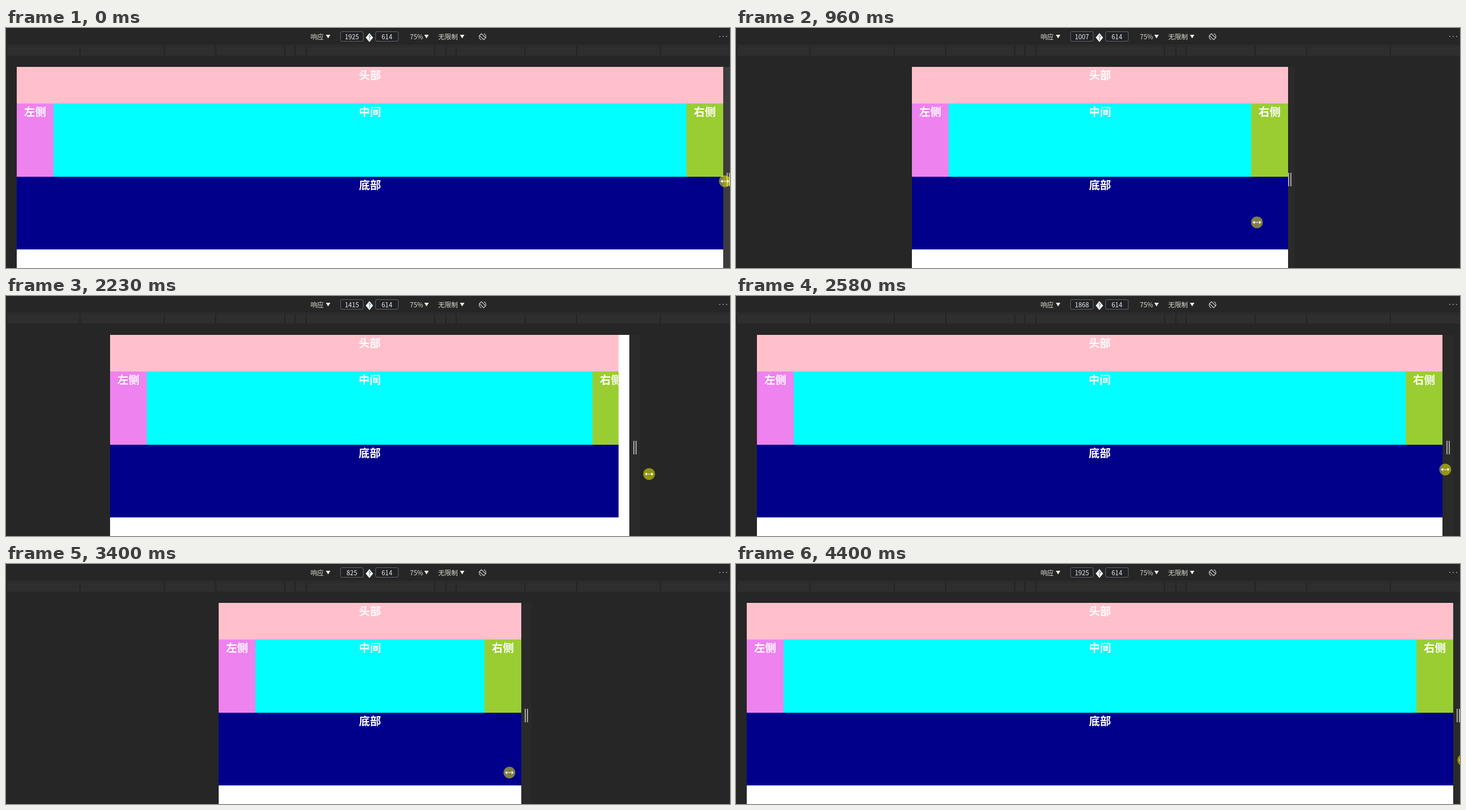
Recreate the animation shown at these times as an HTML page with a canvas. Size 1280 px wide and 426 px high, loop 4.62 s.

```html
<!DOCTYPE html>
<html lang="zh">
<head>
<meta charset="utf-8">
<style>
  html, body { margin: 0; width: 100%; height: 100%; overflow: hidden; background: #262626; }
  canvas { display: block; }
</style>
</head>
<body>
<canvas id="stage" width="1280" height="426"></canvas>
<script>
const ctx = document.getElementById('stage').getContext('2d');
const LOOP = 4620, CENTER = 643.5, SCALE = 1249 / 1925;
const FONT = '"Noto Sans CJK SC", "Noto Sans CJK", "Noto Sans", sans-serif';

// Bursts of eight screen updates: first, last
const BURSTS = [
  [150, 620], [690, 1160], [1220, 1220], [1690, 2170], [2230, 2720],
  [2770, 3260], [3330, 3800], [3870, 4330], [4400, 4400]
];

// time, device width, cursor x, cursor y, then optional lag of pane, layout and clip
const KEYS = [
  [0, 1925, 1271, 272],
  [150, 1910, 1258, 276],
  [620, 1441, 1070, 332],
  [960, 1007, 921, 345, 18, 18, 18],
  [1160, 689, 869, 349, 3],
  [1220, 687, 868, 349, 5],
  [1690, 687, 868, 349, 5],
  [1950, 860, 950, 344],
  [2170, 1231, 1102, 322],
  [2230, 1415, 1137, 316, 0, 0, -29],
  [2450, 1780, 1240, 308],
  [2600, 1882, 1256, 308],
  [2720, 1879, 1250, 312],
  [2980, 1294, 1033, 351],
  [3260, 900, 890, 368],
  [3540, 760, 890, 372],
  [3800, 1102, 1048, 370],
  [3870, 1247, 1116, 368, -59, 0, -59],
  [4260, 1925, 1290, 350],
  [4330, 1925, 1297, 348],
  [4400, 1925, 1286, 348]
];

function heldTime(t) {
  let held = 0;
  for (const [first, last] of BURSTS) {
    if (t < first) break;
    const step = (last - first) / (first === 3330 ? 6 : 7);
    const n = step ? Math.floor((t - first) / step + 0.2) : 0;
    held = Math.min(last, first + n * step);
  }
  return Math.round(held / 10) * 10;
}

function poseAt(t) {
  const i = Math.max(1, KEYS.findIndex(k => k[0] >= t));
  const a = KEYS[i - 1], b = KEYS[i], p = (t - a[0]) / (b[0] - a[0]);
  return Array.from({ length: 7 }, (_, j) => {
    const from = a[j] || 0, to = b[j] || 0;
    return from + (to - from) * p;
  });
}

function rect(x, y, w, h, color) {
  ctx.fillStyle = color;
  ctx.fillRect(x, y, w, h);
}

function text(str, x, y, size, color, align = 'left', weight = 400) {
  ctx.font = `${weight} ${size}px ${FONT}`;
  ctx.textAlign = align;
  ctx.fillStyle = color;
  ctx.fillText(str, x, y);
}

function polygon(color, ...points) {
  ctx.fillStyle = color;
  ctx.beginPath();
  points.forEach(([x, y]) => ctx.lineTo(x, y));
  ctx.fill();
}

function menu(label, x, arrowX) {
  text(label, x, 20, 11.6, '#dcdccf');
  polygon('#f0f0e6', [arrowX - 4, 12], [arrowX + 4, 12], [arrowX, 18.5]);
}

function numberBox(x, value) {
  ctx.beginPath();
  ctx.roundRect(x, 6.5, 40, 17, 2.5);
  ctx.fillStyle = '#202125';
  ctx.fill();
  ctx.strokeStyle = '#63656a';
  ctx.lineWidth = 1;
  ctx.stroke();
  text(value, x + 20, 20, 11.3, '#f2f2f2', 'center');
}

function rotateIcon() {
  ctx.save();
  ctx.translate(842.5, 15.5);
  ctx.strokeStyle = '#d4d4d4';
  ctx.lineWidth = 1.1;
  for (const turn of [0, 1]) {
    ctx.beginPath();
    ctx.arc(0, 0, 6, turn * Math.PI - 1.2, turn * Math.PI + 0.3);
    ctx.stroke();
  }
  ctx.rotate(-Math.PI / 4);
  ctx.strokeRect(-2.3, -5.3, 4.6, 10.6);
  ctx.restore();
}

function toolbar(width) {
  menu('响应', 538.5, 569.5);
  numberBox(591.5, Math.round(width));
  polygon('#f4fbfb', [642.5, 9], [649, 17], [642.5, 25], [636, 17]);
  text('?', 642.5, 21, 10, '#23444c', 'center');
  numberBox(653.5, 614);
  menu('75%', 714, 743.5);
  menu('无限制', 764, 806.5);
  rotateIcon();
  for (const x of [1261, 1267, 1273]) rect(x, 14, 2, 2, '#858585');
  rect(0, 30, 1280, 1, '#333');
  rect(0, 32, 1280, 17, '#2e2e2e');
  // The ruler is symmetric about the page centre
  for (const d of [113.5, 133.5, 151.5, 273.5, 364.5, 513, 643])
    for (const side of [-1, 1]) rect(Math.floor(CENTER + side * d), 32, 1.5, 17, '#202020');
}

function block(label, x, y, w, h, color) {
  rect(x, y, w, h, color);
  text(label, x + w / 2, y + 21.5, 19.5, '#fff', 'center', 700);
}

function page(pane, layout, clip) {
  const left = Math.round(CENTER - pane / 2), w = Math.round(layout);
  rect(left, 69, Math.round(pane), 357, '#fff');
  ctx.save();
  ctx.beginPath();
  ctx.rect(left, 69, Math.round(Math.min(pane, clip)), 357);
  ctx.clip();
  block('头部', left, 69, w, 65, '#ffc0cb');
  block('中间', left, 134, w, 130, '#0ff');
  block('左侧', left, 134, 65, 130, '#ee82ee');
  block('右侧', left + w - 65, 134, 65, 130, '#9acd32');
  block('底部', left, 264, w, 129, '#00008b');
  ctx.restore();
}

function cursor(x, y) {
  ctx.fillStyle = 'rgba(255, 255, 0, 0.5)';
  ctx.beginPath();
  ctx.arc(x, y, 10.5, 0, 2 * Math.PI);
  ctx.fill();
  rect(x - 5, y - 0.5, 10, 1, '#fff');
  for (const d of [-1, 1])
    polygon('#fff', [x + d * 7.5, y], [x + d * 4, y - 3], [x + d * 4, y + 3]);
}

function draw(t) {
  const held = heldTime(t);
  const [, width, cx, cy, ...lags] = poseAt(held);
  const half = width * SCALE / 2, right = Math.round(CENTER + half);
  rect(0, 0, 1280, 426, '#262626');
  toolbar(width);
  rect(right, 69, 18, 357, held ? '#2a2a2a' : '#3c3c3c');
  rect(Math.round(CENTER - half), 69, Math.round(2 * half), 357, '#202125');
  page(...lags.map(lag => (width + lag) * SCALE));
  for (const dx of [6, 10]) rect(right + dx, 257, 2, 24, '#a8a8a8');
  cursor(cx, cy);
}

function tick() {
  draw(performance.now() % LOOP);
  requestAnimationFrame(tick);
}
tick();
</script>
</body>
</html>
```
